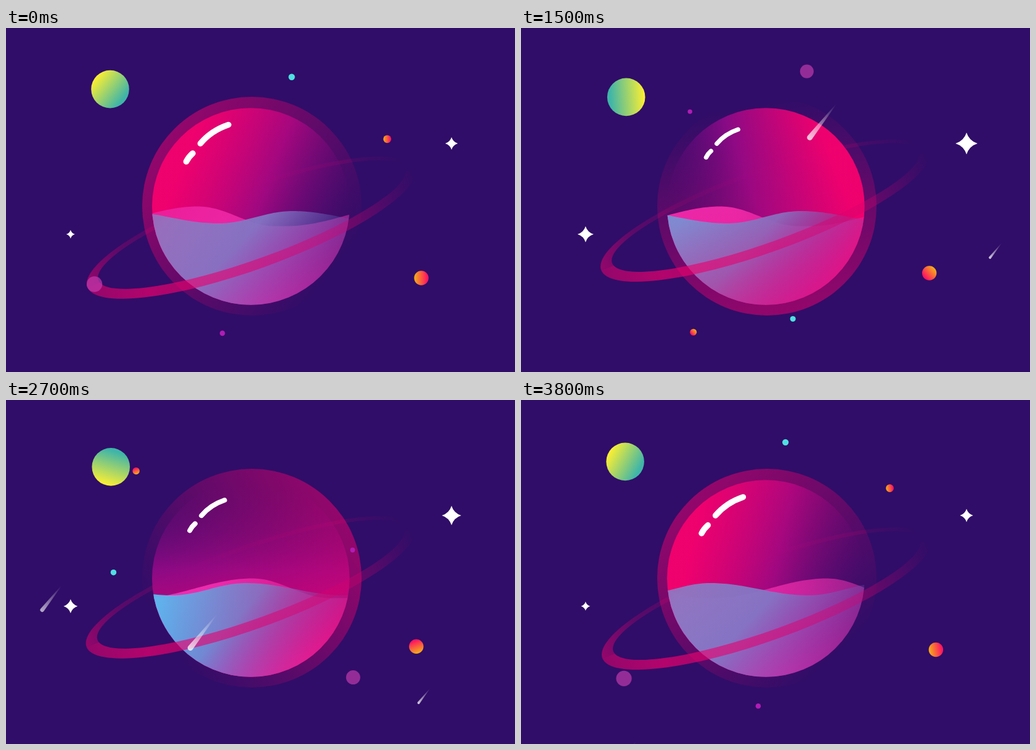
Animation, 826 px wide and 560 px high, one loop 3900 ms. Source, as an HTML page:

```html
<!DOCTYPE html>
<html lang="en">
<head>
<meta charset="utf-8">
<title>Liquid planet</title>
<style>
  html, body { margin: 0; width: 826px; height: 560px; overflow: hidden; background: #300d68; }
  svg { display: block; }
</style>
</head>
<body>
<svg width="826" height="560" viewBox="0 0 826 560">
  <defs>
    <linearGradient id="gSphere" gradientUnits="userSpaceOnUse" x1="237" y1="291" x2="557" y2="291">
      <stop offset=".1" stop-color="#f8006e"/>
      <stop offset=".54" stop-color="#8a0a88"/>
      <stop offset=".97" stop-color="#440b78" stop-opacity="0"/>
    </linearGradient>
    <linearGradient id="gShell" gradientUnits="userSpaceOnUse" x1="221" y1="290" x2="577" y2="290">
      <stop offset="0" stop-color="#f0006e" stop-opacity=".52"/>
      <stop offset=".97" stop-color="#f0006e" stop-opacity="0"/>
    </linearGradient>
    <linearGradient id="gWater" gradientUnits="userSpaceOnUse" x1="275" y1="300" x2="455" y2="468">
      <stop offset="0" stop-color="#54bdf3"/>
      <stop offset=".45" stop-color="#6494da"/>
      <stop offset="1" stop-color="#4a50b0" stop-opacity="0"/>
    </linearGradient>
    <linearGradient id="gBack" gradientUnits="userSpaceOnUse" x1="237" y1="0" x2="557" y2="0">
      <stop offset=".35" stop-color="#ea33b8"/>
      <stop offset="1" stop-color="#d833b0" stop-opacity=".55"/>
    </linearGradient>
    <linearGradient id="gFront" gradientUnits="userSpaceOnUse" x1="-283" y1="0" x2="283" y2="0">
      <stop offset="0" stop-color="#f0006e" stop-opacity=".52"/>
      <stop offset=".16" stop-color="#f0006e" stop-opacity=".68"/>
      <stop offset=".5" stop-color="#e0006e" stop-opacity=".55"/>
      <stop offset=".8" stop-color="#d0006e" stop-opacity=".32"/>
      <stop offset=".99" stop-color="#d0006e" stop-opacity="0"/>
    </linearGradient>
    <linearGradient id="gRear" gradientUnits="userSpaceOnUse" x1="-283" y1="0" x2="283" y2="0">
      <stop offset="0" stop-color="#f0006e" stop-opacity=".52"/>
      <stop offset=".13" stop-color="#d8006e" stop-opacity=".25"/>
      <stop offset=".3" stop-color="#d0006e" stop-opacity=".13"/>
      <stop offset=".8" stop-color="#d0006e" stop-opacity=".16"/>
      <stop offset=".97" stop-color="#d0006e" stop-opacity="0"/>
    </linearGradient>
    <linearGradient id="gLime" x1="0" y1=".5" x2="1" y2=".5">
      <stop offset=".03" stop-color="#f8ee35"/>
      <stop offset=".92" stop-color="#3fb5a8"/>
    </linearGradient>
    <linearGradient id="gFire" x1="0" y1=".5" x2="1" y2=".5">
      <stop offset=".05" stop-color="#f5a81c"/>
      <stop offset=".9" stop-color="#ff1760"/>
    </linearGradient>
    <linearGradient id="gTail" gradientUnits="userSpaceOnUse" x1="-5" y1="0" x2="70" y2="0">
      <stop offset="0" stop-color="#fff" stop-opacity=".8"/>
      <stop offset="1" stop-color="#fff" stop-opacity="0"/>
    </linearGradient>
    <clipPath id="cSphere"><circle cx="397.3" cy="290.5" r="160.3"/></clipPath>
    <clipPath id="cRear"><rect x="-300" y="-100" width="600" height="100"/></clipPath>
    <clipPath id="cFront"><rect x="-300" y="0" width="600" height="100"/></clipPath>
    <path id="ring" fill-rule="evenodd" d="M-283 0A283 67.5 0 0 1 283 0A283 67.5 0 0 1 -283 0ZM-262.4 -4.4A265 56 0 0 1 267.6 -4.4A265 56 0 0 1 -262.4 -4.4Z"/>
    <path id="spark" fill="#fff" d="M0-1Q.24-.24 1 0Q.24 .24 0 1Q-.24 .24-1 0Q-.24-.24 0-1Z"/>
    <path id="comet" fill="url(#gTail)" d="M.6-4.5A4.5 4.5 0 1 0 .6 4.5L70 .4V-.4Z"/>
  </defs>

  <rect width="826" height="560" fill="#300d68"/>
  <g class="tilt"><use href="#ring" fill="url(#gRear)" clip-path="url(#cRear)"/></g>
  <circle cx="397.3" cy="290.5" r="160.3" fill="url(#gSphere)" opacity=".95"/>
  <g clip-path="url(#cSphere)">
    <path id="waveBack" fill="url(#gBack)"/>
    <path id="waveFront" fill="url(#gWater)" opacity=".95"/>
  </g>
  <circle cx="399" cy="290" r="178" fill="url(#gShell)"/>
  <g class="tilt"><use href="#ring" fill="url(#gFront)" clip-path="url(#cFront)"/></g>
  <g id="shine" fill="none" stroke="#fff" stroke-width="9.6" stroke-linecap="round">
    <path d="M315.5 188Q333 167 361 157.5M292.5 217.5Q296.5 209.5 303 204"/>
  </g>

  <use id="starBig" href="#spark"/>
  <use id="starSmall" href="#spark"/>
  <circle id="lime" r="30.8" fill="url(#gLime)"/>
  <circle id="fire" r="11.7" fill="url(#gFire)"/>
  <g id="moons"></g>
  <g id="comets"></g>
</svg>
<script>
const LOOP = 3900, PEAK = 1850;
const $ = id => document.getElementById(id);
const set = (el, attrs) => { for (const a in attrs) el.setAttribute(a, attrs[a]); };
const add = (parent, tag, attrs) => {
  const el = document.createElementNS('http://www.w3.org/2000/svg', tag);
  set(el, attrs);
  return $(parent).appendChild(el);
};
const clamp = v => Math.max(0, Math.min(1, v));

// Orbit centre, radius, start angle; size at rest and how much it shrinks
const moons = [
  { x: 394, y: 278.5, orbit: 245, start: -23.5, r: 6.4, shrink: 1.2, fill: 'url(#gFire)' },
  { x: 383.3, y: 272.7, orbit: 209, start: -67.4, r: 5.2, shrink: .8, fill: '#4fe0e2' },
  { x: 364.5, y: 300, orbit: 250, start: 152.1, r: 12.7, shrink: 2, fill: '#c83cb2', 'fill-opacity': .66 },
  { x: 376, y: 303, orbit: 195.5, start: 97.3, r: 4.3, shrink: .7, fill: '#b01cb4' }
];
for (const m of moons) m.el = add('moons', 'circle', { fill: m.fill, 'fill-opacity': m['fill-opacity'] || 1 });

// Head position at time `at`, velocity per ms, first visible moment
const comets = [
  { x: 553, y: 66, at: 900, vx: -.1412, vy: .1878, size: 1, from: 0 },
  { x: 761, y: 374, at: 1500, vx: -.0763, vy: .0993, size: .44, from: 1100 },
  { x: 18.5, y: 394.5, at: 3100, vx: -.1, vy: .131, size: .73, from: 2450 }
];
for (const c of comets) c.el = add('comets', 'use', { href: '#comet' });

function wave(crest, period, rise, fall, mid, amp) {
  let d = 'M230 470';
  for (let x = 230; x <= 566; x += 4) {
    const p = (((x - crest) % period) + period) % period;
    const c = p < fall ? Math.cos(Math.PI * p / fall)
      : p > period - rise ? Math.cos(Math.PI * (period - p) / rise) : -1;
    d += `L${x} ${(mid - amp * c).toFixed(2)}`;
  }
  return d + 'L566 470Z';
}

// `a` is the direction in which the first colour lies
const aim = (id, a, cx, cy) =>
  set($(id), { gradientTransform: `rotate(${a - 180} ${cx} ${cy})` });

function draw(t) {
  const u = t / LOOP;
  const k = t < PEAK ? t / PEAK : (LOOP - t) / (LOOP - PEAK);
  const turn = 360 * u;
  const spin = turn + 4.3 * Math.sin(2 * Math.PI * u);

  aim('gSphere', 201 + turn, 397.3, 290.5);
  aim('gShell', 218 - turn, 399, 290);
  aim('gLime', 218 + turn, .5, .5);
  aim('gFire', 180 + turn, .5, .5);

  set($('waveFront'), { d: wave(185 + .1795 * t, 280, 120, 160, 308, 10) });
  set($('waveBack'), { d: wave(312 - .2103 * t, 328, 185, 125, 306.5, 16) });

  for (const el of document.querySelectorAll('.tilt'))
    set(el, { transform: `translate(${398 - 2.5 * k} ${325 - 34.3 * k}) rotate(-20)` });
  set($('shine'), { transform: `translate(325 189) scale(${1 - .3 * k}) translate(-325 -189)` });

  set($('starBig'), { transform: `translate(723 188) scale(${10.2 + 9.4 * k})` });
  set($('starSmall'), { transform: `translate(104.8 335.7) scale(${7 + 7.4 * k})` });
  set($('lime'), { cx: 169 + 2.1 * k, cy: 99.6 + 15.8 * k });
  set($('fire'), { cx: 674 - 14 * k, cy: 407 - 9.8 * k });

  for (const m of moons) {
    const a = (m.start + spin) * Math.PI / 180;
    set(m.el, {
      cx: m.x + m.orbit * Math.cos(a),
      cy: m.y + m.orbit * Math.sin(a),
      r: m.r - m.shrink * k
    });
  }

  for (const c of comets) {
    const dt = t - c.at;
    set(c.el, {
      transform: `translate(${c.x + c.vx * dt} ${c.y + c.vy * dt}) rotate(-51.7) scale(${c.size})`,
      opacity: clamp((t - c.from) / 300)
    });
  }
}

// Ten steps per second
let begin = null;
function tick(now) {
  if (begin === null) begin = now;
  draw(Math.floor(((now - begin) % LOOP) / 100) * 100);
  requestAnimationFrame(tick);
}
draw(0);
requestAnimationFrame(tick);
</script>
</body>
</html>
```
